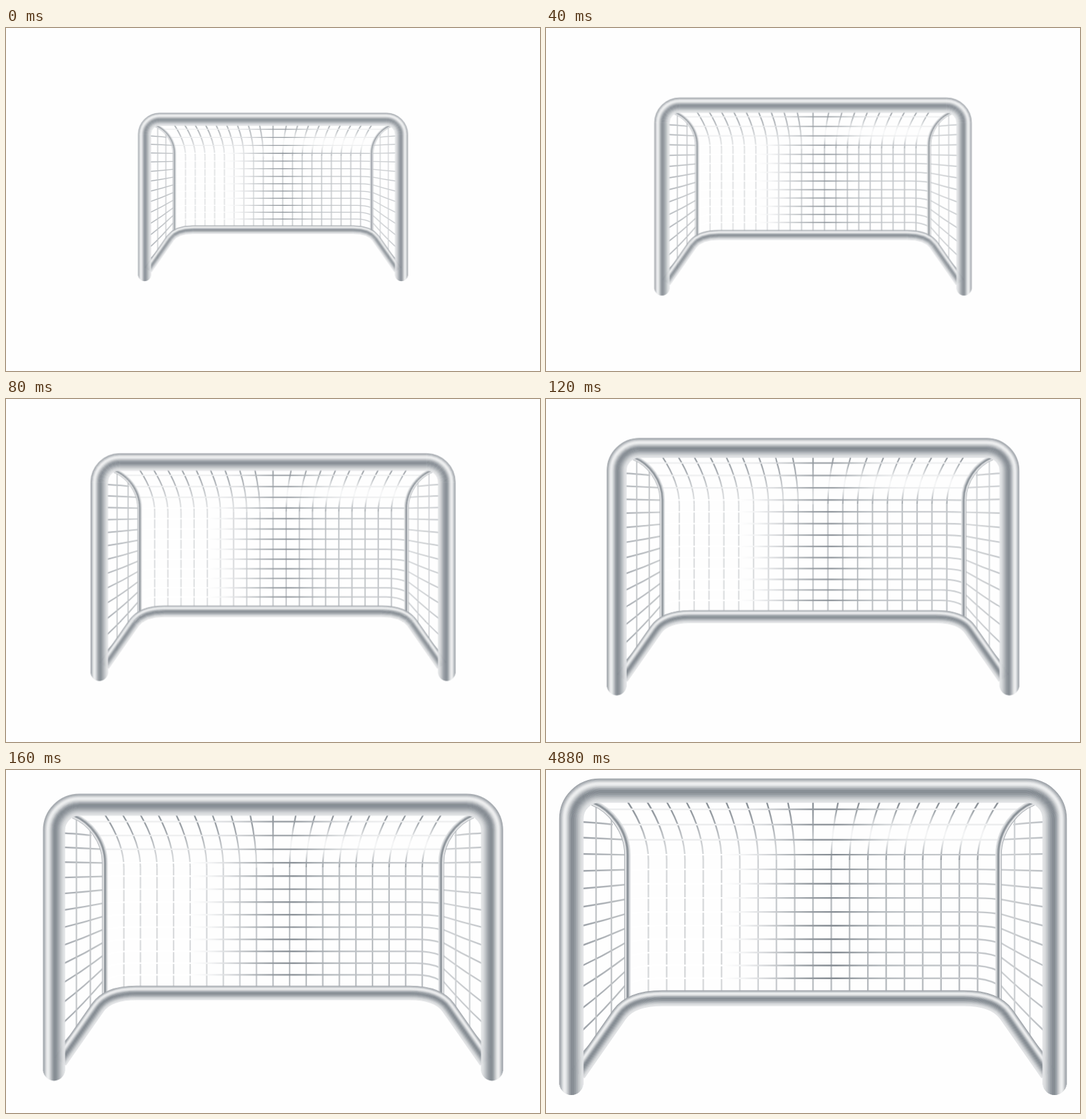
These frames come from a looping animation (800x515 px, 8 s). An HTML page:

```html
<!DOCTYPE html>
<html lang="en">
<head>
<meta charset="utf-8">
<title>Goal</title>
<style>
  html, body { margin: 0; width: 100%; height: 100%; overflow: hidden; background: #fefefe; }
  svg { display: block; width: 100vw; height: 100vh; }
  path { fill: none; }
  #goal { transform-origin: 400px 257.5px; animation: approach 8s infinite; }
  @keyframes approach {
    0% { transform: scale(.5316); animation-timing-function: steps(5, end); }
    2.5%, 100% { transform: scale(1); }
  }
</style>
</head>
<body>
<svg viewBox="0 0 800 515">
  <defs id="defs"></defs>
  <g id="goal"></g>
</svg>
<script>
const NS = 'http://www.w3.org/2000/svg';
const goal = document.getElementById('goal');
const defs = document.getElementById('defs');

function add(parent, tag, attrs) {
  const el = document.createElementNS(NS, tag);
  for (const key in attrs) el.setAttribute(key, attrs[key]);
  return parent.appendChild(el);
}

const line = (d, stroke, parent = goal, width = 2.4) =>
  add(parent, 'path', { d, stroke, 'stroke-width': width });

const ease = t => {
  t = Math.min(1, Math.max(0, t));
  return t * t * (3 - 2 * t);
};
const bell = t => Math.exp(-t * t);

// Cool grey, from 0 (white) upwards
function silver(dark) {
  const grey = 255 - dark, tint = dark * .06;
  return `rgb(${grey - tint},${grey},${grey + tint})`;
}

// Gradient in stage units along x or y, sampled from dark(position)
function gradient(id, axis, from, to, dark) {
  const g = add(defs, 'linearGradient', {
    id, gradientUnits: 'userSpaceOnUse', x1: 0, y1: 0, x2: 0, y2: 0,
    [axis + '1']: from, [axis + '2']: to
  });
  for (let t = 0; t <= 1; t += 1 / 16)
    add(g, 'stop', { offset: t, 'stop-color': silver(dark(from + (to - from) * t)) });
  return `url(#${id})`;
}

// Darkness across a tube: grey rim, highlight, core shadow, soft inner side
function sheen(t) {
  const light = 17, core = 116;
  if (t < .22) return 92 + (light - 92) * ease(t / .22);
  if (t < .54) return light + (core - light) * ease((t - .22) / .32);
  return core + (28 - core) * ease((t - .54) / .46);
}

// Lays thin strokes side by side; path(d) is the outline at offset d
function tube(size, path, parent = goal) {
  const step = .75;
  for (let d = step / 2; d < size; d += step)
    line(path(d), silver(sheen(d / size)), parent, 1.3);
}

// Net row heights: on the back panel, at the back uprights, at the front posts
const backY = k => 82 + 22.9 * k - .175 * k * k;
const cornerY = k => backY(k) + .075 * k * k;
const postY = k => 78 + 23 * k + .5 * k * k;

const columns = gradient('columns', 'x', 125, 675, x => 38 + 30 * ease((x - 270) / 170));
const roofLeft = gradient('roofLeft', 'y', 47, 135, y => 110 - 70 * ease((y - 47) / 80));
const roofRight = gradient('roofRight', 'y', 47, 135,
  y => 60 + 50 * Math.cos((y - 47) / 100 * 2 * Math.PI));
const rows = gradient('rows', 'x', 125, 675, x => x < 440
  ? 118 * ease((x - 260) / 180)
  : 55 + 63 * Math.exp((440 - x) / 45));
const roofRows = gradient('roofRows', 'x', 110, 690, x => 18 + 90 * bell((x - 420) / 75));

// A hair of slant keeps the gradient's box of straight lines from collapsing
for (let i = -9; i <= 9; i++) {
  const x = 400 + 27.4 * i;
  const top = x + 10.5 * Math.sign(i) * Math.sqrt(Math.abs(i));
  line(`M${top} 47Q${x} 95 ${x} 135`, i < 1 ? roofLeft : roofRight);
  line(`M${x} 135L${x + .01} 333`, columns);
}
for (let k = -1; k < 12; k++) {
  const y = backY(k), end = cornerY(k), x = k < 2 ? 104 + 13 * k : 124;
  line(`M${x} ${end}Q${x + 16} ${y} ${x + 40} ${y + .01}` +
    `H${760 - x}Q${784 - x} ${y} ${800 - x} ${end}`, k < 2 ? roofRows : rows);
}

const left = add(goal, 'g', {});
const right = add(goal, 'g', { transform: 'matrix(-1 0 0 1 800 0)' });

[[left, 92, 58], [right, 62, 46]].forEach(([side, near, far], i) => {
  const color = gradient('side' + i, 'x', 54, 122, x => near + (far - near) * (x - 54) / 68);
  for (let k = 0; k <= 12; k++) {
    const a = postY(k), b = cornerY(k), x = k ? 120 : 100;
    line(`M54 ${a}Q87 ${(a + b) / 2 + (a - b) * .06} ${x} ${b}`, color, side);
  }
  line('M75 56V425', silver(far), side);
  line('M98 72V378', silver(far), side);

  // Back upright
  tube(9, d => {
    const x = 117.5 + d;
    return `M${68 + d * .6} ${53 - d * .8}C${92 + d} ${62 - d * .5} ${x} ${92 - d * .4} ${x} 127V346`;
  }, side);
});

// Ground bar, offset along its normals on both the level and sloping parts
tube(23, d => {
  const o = d - 11.5;
  const nx = .82 * o, ny = .57 * o, cx = 127 + .524 * o, y = 342.5 + o;
  return `M${48 + nx} ${456 + ny}L${110 + nx} ${367 + ny}Q${cx} ${y} 174 ${y}` +
    `H626Q${800 - cx} ${y} ${690 - nx} ${367 + ny}L${752 - nx} ${456 + ny}`;
});

// Front posts and crossbar
tube(36, d => {
  const x = 20 + d, y = 13 + d, r = 60 - d;
  const foot = 469 + 19 * Math.sqrt(1 - (d / 18 - 1) ** 2);
  return `M${x} ${foot}V73A${r} ${r} 0 0 1 80 ${y}H720A${r} ${r} 0 0 1 ${800 - x} 73V${foot}`;
});
</script>
</body>
</html>
```
